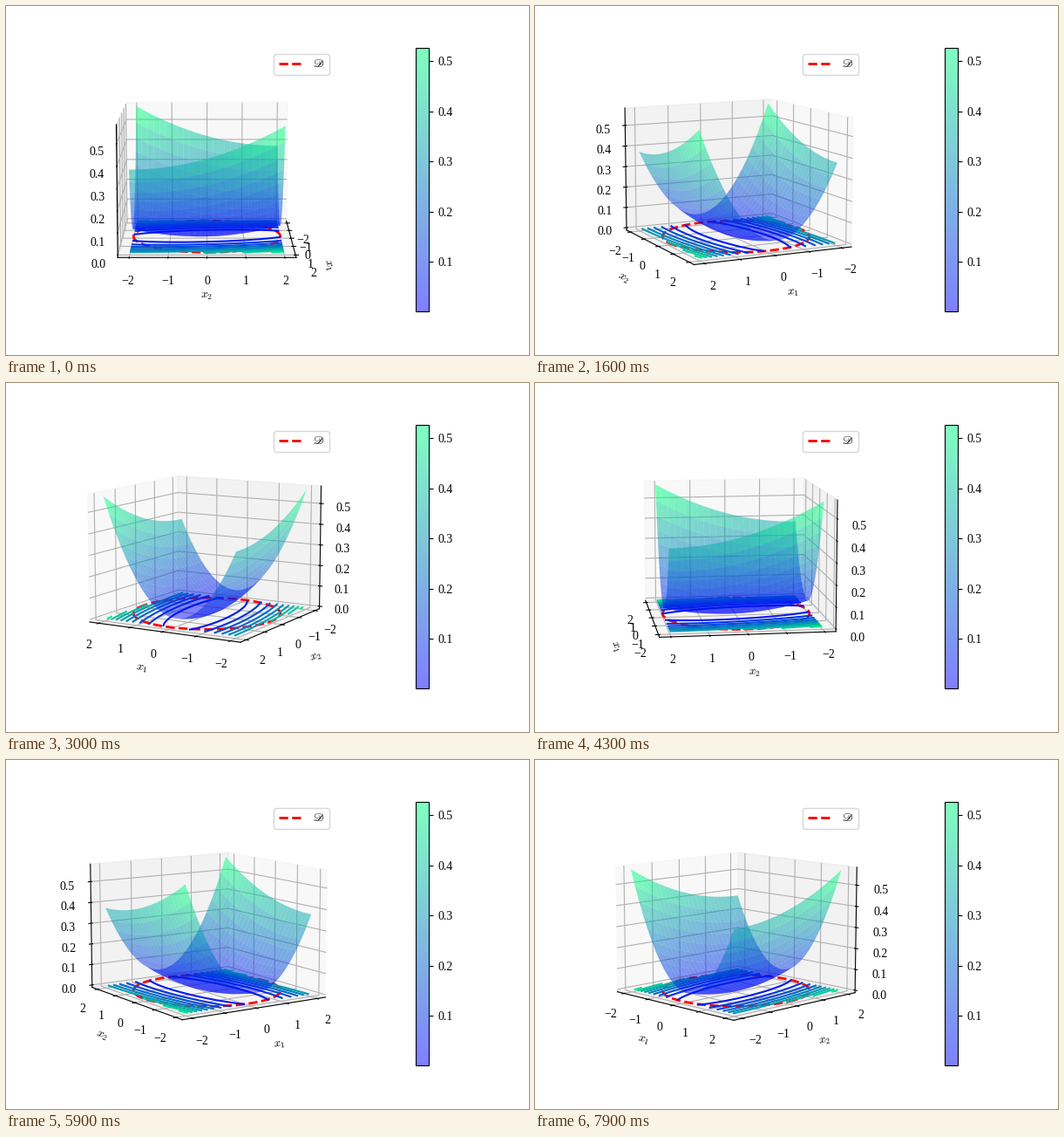
Animation, 600 px wide and 400 px high, one loop 8000 ms. Source, as a matplotlib script:

```python
import numpy as np
import matplotlib.pyplot as plt
from matplotlib.animation import FuncAnimation

W, H, DPI = 600, 400, 100
FRAMES, INTERVAL = 80, 100
AZIM_STEP = 4

plt.rcParams.update({
    "font.family": "Liberation Serif",
    "mathtext.fontset": "stix",
    "font.size": 10,
})


def box(x, y, w, h):
    """Pixel rectangle (origin bottom left) as figure fractions."""
    return [x / W, y / H, w / W, h / H]


def padded(lo, hi):
    pad = (hi - lo) / 48
    return lo - pad, hi + pad


# Quadratic function V = a x1^2 + 2c x1 x2 + b x2^2
a, b, c = 0.1062, 0.0123, 0.01225
s = np.linspace(-2, 2, 25)
X1, X2 = np.meshgrid(s, s)
V = a * X1**2 + 2 * c * X1 * X2 + b * X2**2

fig = plt.figure(figsize=(W / DPI, H / DPI), dpi=DPI, facecolor="white")
ax = fig.add_axes(box(75.5, 50, 302, 302), projection="3d", facecolor="none")

surf = ax.plot_surface(X1, X2, V, cmap="winter", alpha=0.5, rstride=1,
                       cstride=1, linewidth=0, edgecolor="none",
                       antialiased=True)
ax.contour(X1, X2, V, levels=np.arange(1, 10) * 0.06, cmap="winter",
           vmin=0, vmax=0.6, zdir="z", offset=0)
t = np.linspace(0, 2 * np.pi, 200)
ax.plot(2 * np.cos(t), 2 * np.sin(t), 0 * t, "r--", lw=2,
        label=r"$\mathscr{D}$")

ax.set_xlim(*padded(-2.2, 2.2))
ax.set_ylim(*padded(-2.2, 2.2))
ax.set_zlim(*padded(0, V.max()))
ax.set_xticks(range(-2, 3))
ax.set_yticks(range(-2, 3))
ax.set_zticks(np.arange(6) / 10)
ax.set_xlabel("$x_1$", math_fontfamily="cm")
ax.set_ylabel("$x_2$", math_fontfamily="cm")
ax.legend(loc="upper right")

cax = fig.add_axes(box(470.25, 50, 15.1, 302))
fig.colorbar(surf, cax=cax, ticks=np.arange(1, 6) / 10)


def draw(i):
    # The tiny offset settles which walls show when seen head-on.
    ax.view_init(elev=10, azim=AZIM_STEP * i + 0.01)
    return []


anim = FuncAnimation(fig, draw, frames=FRAMES, interval=INTERVAL,
                     init_func=lambda: draw(0), repeat=True, repeat_delay=0)
plt.show()
```
